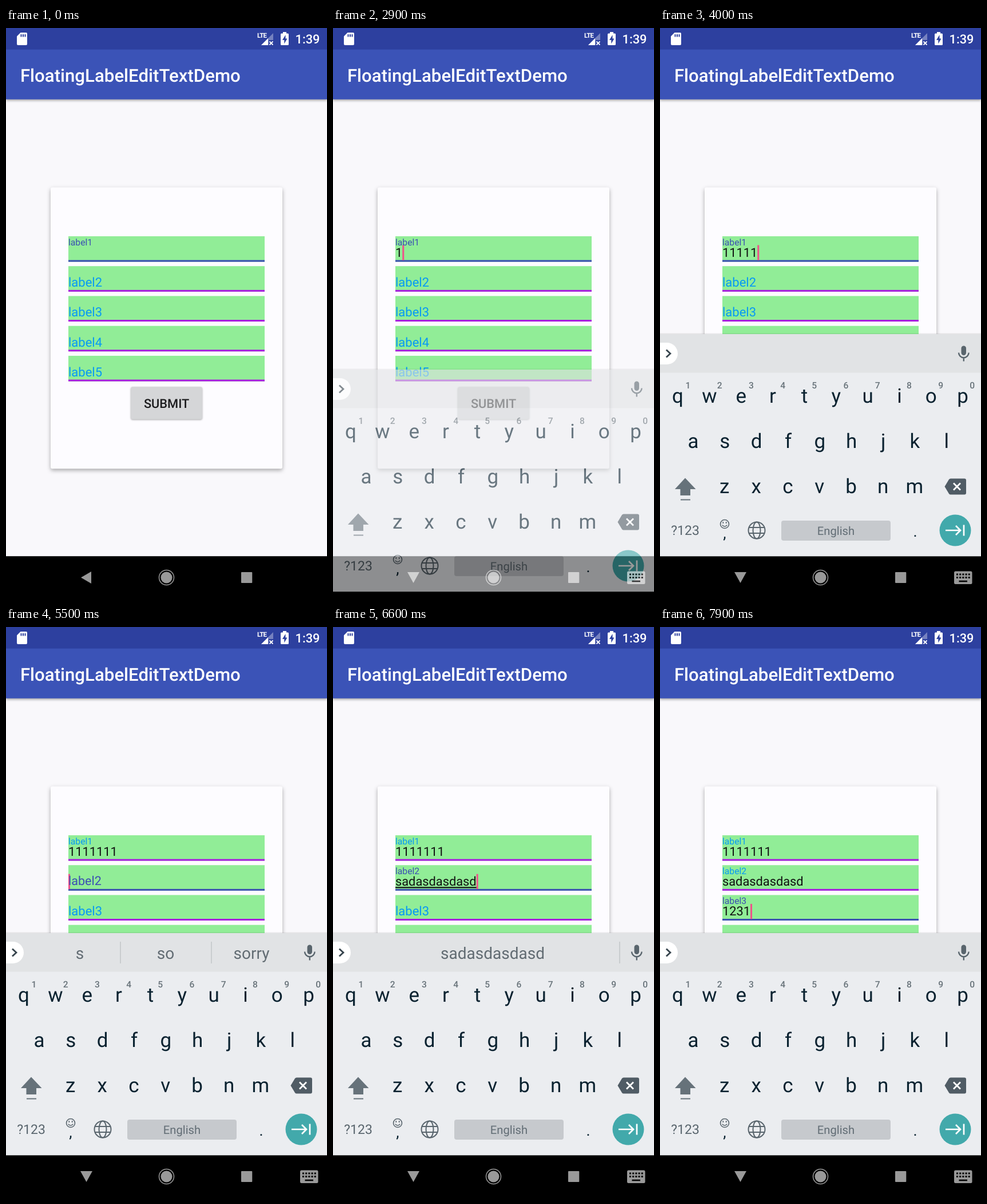
Write an HTML page that moves like this. It is 561 by 998 pixels and loops after 8000 ms.

```html
<!DOCTYPE html>
<html lang="en">
<head>
<meta charset="utf-8">
<title>Floating label form</title>
<style>
  html, body { margin: 0; width: 100%; height: 100%; overflow: hidden; background: #000; }
  svg { display: block; width: 100%; height: 100%; }
  text { font-family: Roboto, sans-serif; text-rendering: geometricPrecision; }
  .medium { font-weight: 500; }
  .center { text-anchor: middle; }
  .value { font-size: 21.8px; fill: #111; text-decoration-thickness: 1.5px; }
  .key { font-size: 35px; fill: #0a2230; text-anchor: middle; }
  .hint { font-size: 15.6px; font-weight: 500; fill: #68737a; text-anchor: middle; }
  .word { font-size: 28px; fill: #626c73; text-anchor: middle; }
  .bar { filter: drop-shadow(0 2px 2px rgba(0, 0, 0, .35)); }
  .card { filter: drop-shadow(0 3px 3.5px rgba(0, 0, 0, .32)); }
  .button { filter: drop-shadow(0 1.5px 1.5px rgba(0, 0, 0, .35)); }
  .line { fill: none; stroke-width: 2; }
</style>
</head>
<body>
<svg viewBox="0 0 561 998" preserveAspectRatio="none">
  <rect width="561" height="998" fill="#f9f8fb"/>
  <rect class="bar" width="561" height="124.7" fill="#3b53b7"/>
  <rect width="561" height="37.6" fill="#2d409f"/>
  <text class="medium" x="24.9" y="93.5" font-size="31.2" fill="#fff">FloatingLabelEditTextDemo</text>

  <g id="status" fill="#fff">
    <path d="M25.5 8H35Q37 8 37 10V28Q37 30 35 30H21Q19 30 19 28V14.5Z"/>
    <path d="M26.5 11v4.5M30 11v4.5M33.5 11v4.5" stroke="#2d409f" stroke-width="2"/>
    <text x="439" y="17.3" font-size="11.5" font-weight="700" letter-spacing="-.9">LTE</text>
    <path d="M446 30L467 9V21H459V30Z" opacity=".35"/>
    <path d="M446 30L458 18V30Z"/>
    <path d="M460.5 23.5l6 6m0-6l-6 6" stroke="#fff" stroke-width="1.8"/>
    <path d="M484 9.5V7h6v2.5h2.5q1.5 0 1.5 1.5v17.5q0 1.5-1.5 1.5h-11q-1.5 0-1.5-1.5V11q0-1.5 1.5-1.5Z"/>
    <path d="M488.5 12l-5.5 9h3.3v6.5l5.2-9h-3Z" fill="#2d409f"/>
    <text class="medium" x="505.5" y="27" font-size="21.8">1:39</text>
  </g>

  <rect class="card" x="78" y="278.5" width="405" height="491.7" rx="3" fill="#fdfcff"/>
  <g id="fields"></g>
  <rect class="button" x="218.3" y="627.3" width="124.5" height="56.5" rx="3" fill="#d5d6d8"/>
  <text class="medium center" x="280.6" y="663.8" font-size="21.8" fill="#1c1c1e">SUBMIT</text>

  <rect y="923.2" width="561" height="75" fill="#000"/>

  <g id="keyboard">
    <rect y="533.5" width="561" height="2" fill="#000" opacity=".08"/>
    <rect y="535" width="561" height="388.2" fill="#ebedf0"/>
    <rect y="535" width="561" height="67.5" fill="#e1e3e5"/>
    <path d="M0 550H12a19 19 0 0 1 0 38H0Z" fill="#fff"/>
    <path class="line" d="M11 562.5l7 6.5l-7 6.5" stroke="#35434c" stroke-width="2.8" style="stroke-width:2.8"/>
    <g id="mic" fill="#59656d" stroke="#59656d">
      <rect x="526.5" y="555.5" width="8.5" height="16.5" rx="4.2" stroke="none"/>
      <path class="line" d="M522 567.5a8.8 8.8 0 0 0 17.6 0M530.8 576v6.5" style="stroke-width:2.4"/>
    </g>
    <g id="suggestions"></g>
    <g id="keys"></g>
    <path d="M44 786.5L62.5 806H53v11H35.500V806H26Z" fill="#66727a"/>
    <path d="M36 824.5h17" stroke="#66727a" stroke-width="2"/>
    <path d="M508 787.500h24q3 0 3 3v22q0 3-3 3h-24q-2 0-3-1.500l-7.500-12.500l7.500-12.500q1-1.500 3-1.500Z" fill="#505c65"/>
    <path d="M513 795.500l12 12m0-12l-12 12" stroke="#fff" stroke-width="2.800"/>
    <text class="center" x="44" y="886.3" font-size="23" fill="#59656d">?123</text>
    <g stroke="#59656d" class="line">
      <circle cx="113" cy="867" r="7.5" style="stroke-width:1.6"/>
      <path d="M110.300 863v3m5.400-3v3M108.800 868.800q4.200 5 8.400 0" style="stroke-width:1.6"/>
      <circle cx="169" cy="878" r="14.500"/>
      <ellipse cx="169" cy="878" rx="6.500" ry="14.500"/>
      <path d="M155.500 873h27m-27 10h27"/>
    </g>
    <text class="center" x="113" y="892" font-size="27" fill="#0a2230">,</text>
    <rect x="212" y="861" width="191" height="35" rx="4" fill="#c6c9cd"/>
    <text class="center" x="307.500" y="885.600" font-size="20.200" fill="#626d75">English</text>
    <text class="center" x="446" y="889" font-size="27" fill="#0a2230">.</text>
    <circle cx="516" cy="878" r="27.500" fill="#42a9ab"/>
    <path class="line" d="M499 878h26m-8-8l8 8l-8 8M531 868.500v19" stroke="#fff" style="stroke-width:2.700"/>
  </g>

  <g id="navigation" fill="#fff" opacity=".6">
    <path id="back"/>
    <circle cx="280.500" cy="960.500" r="10"/>
    <circle class="line" cx="280.500" cy="960.500" r="13" stroke="#fff" style="stroke-width:1.500"/>
    <rect x="411" y="951" width="19.300" height="19" rx="1"/>
    <g id="switcher">
      <rect x="514" y="949.500" width="31.500" height="22.500" rx="2.500"/>
      <path d="M518 955h24M518 960.500h24" stroke="#000" stroke-width="3" stroke-dasharray="3 2.200"/>
      <path d="M522.500 967h14.500" stroke="#000" stroke-width="2.600"/>
    </g>
  </g>
</svg>

<script>
const LOOP = 8000, STEP = 100, LEFT = 109, PITCH = 52.23, KEY_PITCH = 55.35;
const ACCENT = '#3b4fb3', LABEL = '#0799f5', LINE = '#a91be0';
const WORD = 'sadasdasdasd';
const CURSOR_OFF = [[0, 400], [900, 1400], [1900, 2400], [3500, 4000], [4700, 5100]];
const PRESSES_ONE = [2800, 3000, 3100, 3200, 4000, 4100, 4200];
const PRESSES_THREE = [7400, 7600, 7800, 7900];
const FLOAT_START = [-1000, 5450, 7350, Infinity, Infinity];

const byId = id => document.getElementById(id);
const clamp = (v, lo = 0, hi = 1) => Math.min(hi, Math.max(lo, v));
const mix = (a, b, p) => a + (b - a) * p;
const count = (times, t) => times.filter(time => time <= t).length;

function add(parent, tag, attributes, content = '') {
  const node = document.createElementNS('http://www.w3.org/2000/svg', tag);
  set(node, attributes);
  node.textContent = content;
  return parent.appendChild(node);
}
function set(node, attributes) {
  for (const name in attributes) node.setAttribute(name, attributes[name]);
}

const fields = Array.from({ length: 5 }, (_, i) => {
  const group = add(byId('fields'), 'g', { transform: `translate(${LEFT} ${364 + i * PITCH})` });
  add(group, 'rect', { width: 343, height: 44.6, fill: '#91ed97' });
  return {
    line: add(group, 'rect', { y: 41.6, width: 343, height: 3 }),
    cursor: add(group, 'rect', { y: 15.5, width: 3, height: 26.5, fill: '#f0528a' }),
    label: add(group, 'text', {}, `label${i + 1}`),
    value: add(group, 'text', { class: 'value', y: 36 })
  };
});

[['qwertyuiop', 31, 655.4], ['asdfghjkl', 58, 734], ['zxcvbnm', 112.8, 812.6]].forEach(([row, x, y]) =>
  [...row].forEach((letter, i) => add(byId('keys'), 'text', { class: 'key', x: x + i * KEY_PITCH, y }, letter)));
[...'1234567890'].forEach((digit, i) =>
  add(byId('keys'), 'text', { class: 'hint', x: 49 + i * 55.2, y: 629.5 }, digit));

const words = [129, 279, 429].map(x => add(byId('suggestions'), 'text', { class: 'word', x, y: 580 }));
const dividers = [200, 359, 501].map(x =>
  add(byId('suggestions'), 'rect', { x: x - .7, y: 550, width: 1.4, height: 38, fill: '#bfc3c6' }));

function drawFields(t) {
  const focus = t < 5100 ? 0 : t < 6900 ? 1 : 2;
  const typed = Math.round(clamp((t - 5500) / 1100) * WORD.length);
  const values = ['1'.repeat(count(PRESSES_ONE, t)), WORD.slice(0, typed), '1231'.slice(0, count(PRESSES_THREE, t)), '', ''];
  const blinkedOff = CURSOR_OFF.some(([from, to]) => t >= from && t < to);

  fields.forEach(({ line, cursor, label, value }, i) => {
    const focused = i === focus;
    const raised = (1 - Math.cos(Math.PI * clamp((t - FLOAT_START[i]) / 300))) / 2;
    value.textContent = values[i];
    value.style.textDecorationLine = focused && i === 1 ? 'underline' : 'none';
    set(line, { fill: focused ? ACCENT : LINE });
    set(label, { y: mix(36, 15.7, raised), 'font-size': mix(22, 15.7, raised), fill: focused ? ACCENT : LABEL });
    set(cursor, {
      x: values[i] ? value.getComputedTextLength() : 0,
      opacity: focused && !blinkedOff ? 1 : 0
    });
  });
  return typed;
}

function drawSuggestions(t, typed) {
  const active = t >= 5100 && t < 7000;
  const single = typed > 1;
  const shown = !active ? [] : single ? ['', WORD.slice(0, typed), ''] : t >= 5400 ? ['s', 'so', 'sorry'] : [];
  words.forEach((node, i) => node.textContent = shown[i] || '');
  dividers.forEach((node, i) => set(node, { opacity: active && single === (i === 2) ? 1 : 0 }));
}

function drawKeyboard(t) {
  const open = t >= 2800;
  const entry = clamp((t - 2750) / 250);
  set(byId('keyboard'), { opacity: entry, transform: `translate(0 ${155 * (1 - entry)})` });
  set(byId('back'), { d: open ? 'M130 951H151L140.500 970Z' : 'M131 960.500L149 950V971Z' });
  set(byId('switcher'), { opacity: open ? 1 : 0 });
}

function render() {
  const t = Math.floor(performance.now() % LOOP / STEP) * STEP;
  const typed = drawFields(t);
  drawSuggestions(t, typed);
  drawKeyboard(t);
  requestAnimationFrame(render);
}
render();
</script>
</body>
</html>
```
